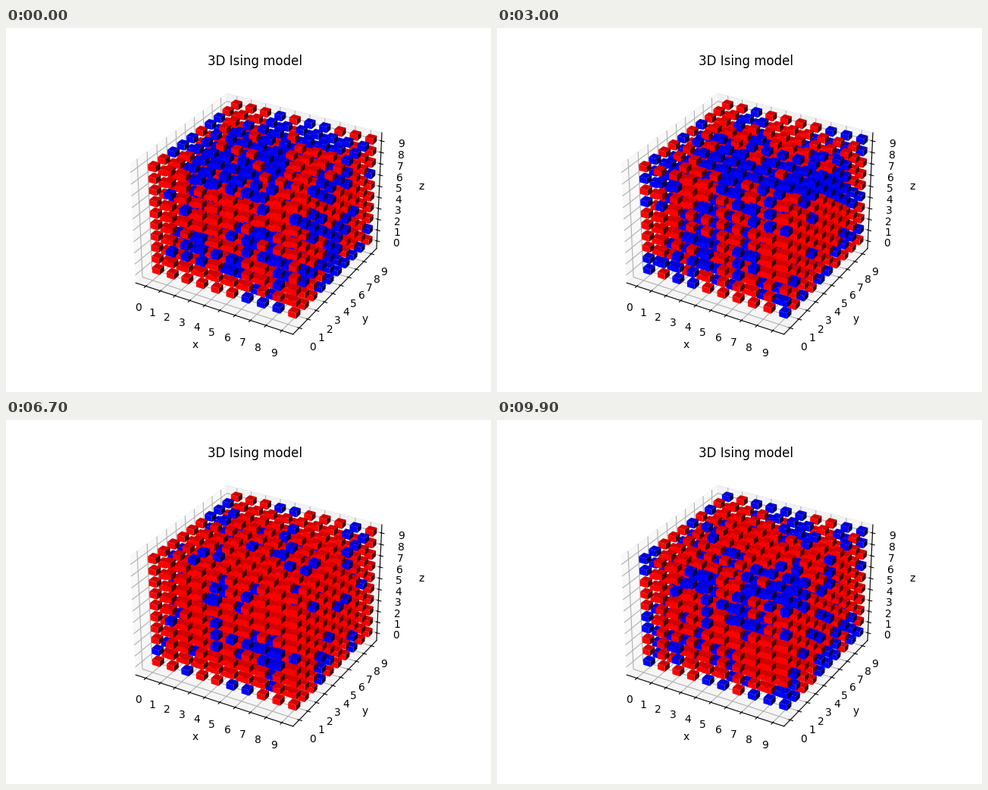
Write a matplotlib script that moves like this. It is 640 px wide and 480 px high and loops after 10000 ms.

```python
import numpy as np
import matplotlib.pyplot as plt
from matplotlib.animation import FuncAnimation
from mpl_toolkits.mplot3d.art3d import Poly3DCollection

N = 10            # spins per side
SIDE = 0.5        # cube edge
FRAMES = 100
INTERVAL = 100
TEMP = 4.5        # in units of J / k
RATE = 0.4        # share of spins tried per step

rng = np.random.default_rng(12)
cells = np.indices((N, N, N))
parity = cells.sum(axis=0) % 2


def sweep(spins, rate):
    """Metropolis update of a random share of both sublattices."""
    for p in (0, 1):
        field = sum(np.roll(spins, s, axis) for axis in range(3) for s in (1, -1))
        accept = rng.random(spins.shape) < np.exp(np.minimum(0, -2 * spins * field / TEMP))
        tried = rng.random(spins.shape) < rate
        spins = np.where((parity == p) & tried & accept, -spins, spins)
    return spins


def simulate():
    spins = np.where(rng.random((N, N, N)) < 0.6, 1, -1)
    for _ in range(6):
        spins = sweep(spins, 1)
    history = [spins]
    for _ in range(FRAMES - 1):
        history.append(sweep(history[-1], RATE))
    return history


# The three faces turned to the viewer (-y, +x, +z) and their brightness
FACES = SIDE * np.array([
    [(0, 0, 0), (1, 0, 0), (1, 0, 1), (0, 0, 1)],
    [(1, 0, 0), (1, 1, 0), (1, 1, 1), (1, 0, 1)],
    [(0, 0, 1), (1, 0, 1), (1, 1, 1), (0, 1, 1)],
])
SHADE = np.array([1, 0.3, 0.825])
RED, BLUE = np.array([1, 0, 0]), np.array([0, 0, 1])


def face_colors(spins):
    base = np.where(spins.reshape(-1, 1) > 0, RED, BLUE)
    return (base[:, None, :] * SHADE[:, None]).reshape(-1, 3)


states = simulate()
corners = cells.reshape(3, -1).T
quads = (corners[:, None, None, :] + FACES).reshape(-1, 4, 3)

fig = plt.figure(figsize=(6.4, 4.8), dpi=100)
ax = fig.add_subplot(projection="3d")
ax.set_title("3D Ising model")
cubes = Poly3DCollection(quads, facecolors=face_colors(states[0]), linewidths=0)
ax.add_collection3d(cubes)

pad = 0.5 + N / 48
for name in "xyz":
    ax.set(**{f"{name}label": name, f"{name}ticks": range(N),
              f"{name}lim": (-pad, N - 1 + pad)})


def update(i):
    cubes.set_facecolor(face_colors(states[i]))
    return [cubes]


anim = FuncAnimation(fig, update, frames=FRAMES, interval=INTERVAL,
                     repeat=True, repeat_delay=0, blit=False)
plt.show()
```
